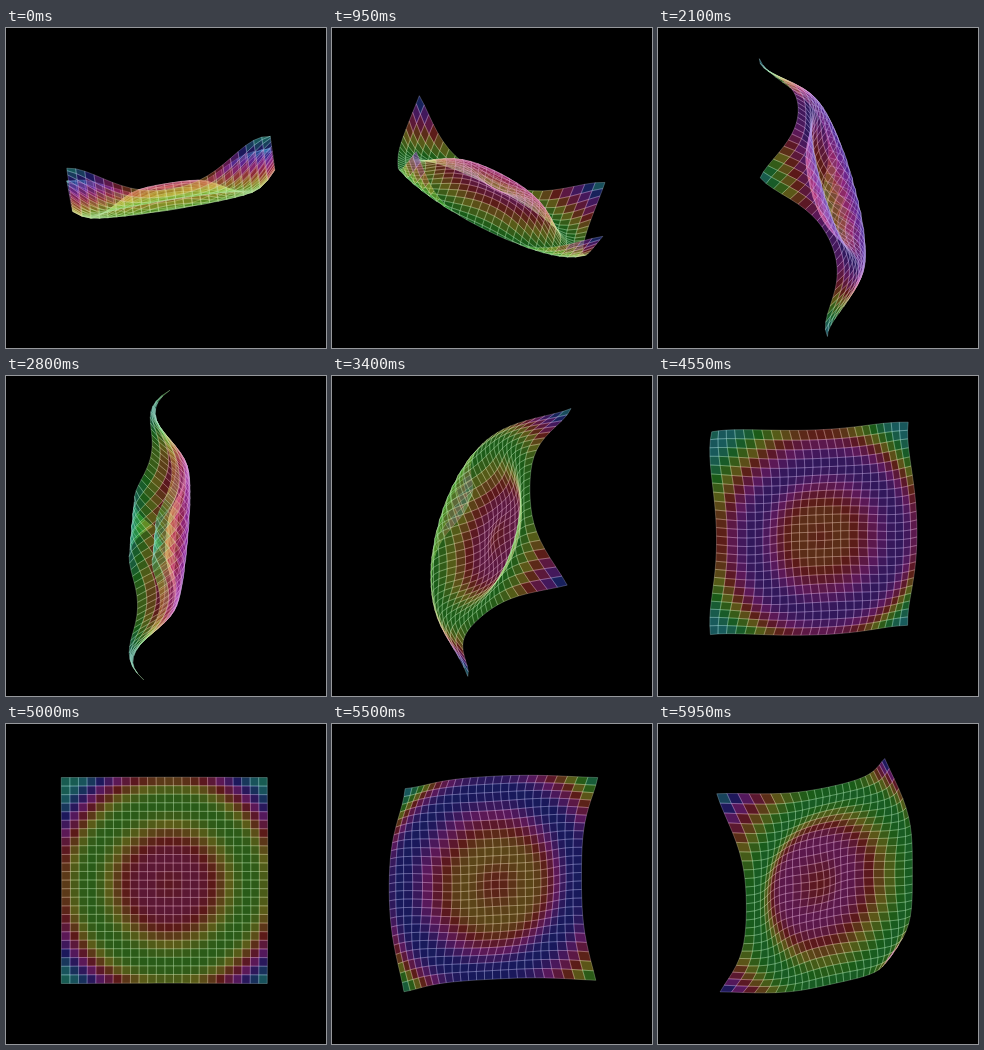
Animation, 320 px wide and 320 px high, one loop 6 s. Source, as an HTML page with a canvas:

```html
<!DOCTYPE html>
<html lang="en">
<head>
<meta charset="utf-8">
<title>Rippling mesh</title>
<style>
html, body { margin: 0; width: 100%; height: 100%; overflow: hidden; background: #000; }
canvas { display: block; }
</style>
</head>
<body>
<canvas id="stage" width="320" height="320"></canvas>
<script>
const ctx = document.getElementById('stage').getContext('2d');
const LOOP = 6000, STEP = 50;
const POINTS = 25, RADIUS = 103;
const CENTER = { x: 163, y: 160.5 };

// Grid index to a coordinate of about -1 to 1; the grid sits half a cell off centre
const coord = i => (2 * i - POINTS) / (POINTS - 1);

// Radial wave whose amplitude grows with distance
function height(x, y, phase) {
  const r = Math.hypot(x, y);
  return 0.215 * r * Math.sin(5 * r - phase);
}

// Turn about the vertical axis (b), then the horizontal axis (a)
function makeProjector(a, b) {
  const ca = Math.cos(a), sa = Math.sin(a), cb = Math.cos(b), sb = Math.sin(b);
  return (x, y, z) => {
    const depth = z * cb - x * sb;
    return {
      x: CENTER.x + RADIUS * (x * cb + z * sb),
      y: CENTER.y + RADIUS * (y * ca - depth * sa),
      z
    };
  };
}

function drawCell(corners) {
  const z = corners.reduce((sum, p) => sum + p.z, 0) / 4;
  const hue = (z * 660 + 720) % 360;
  ctx.beginPath();
  corners.forEach(p => ctx.lineTo(p.x, p.y));
  ctx.closePath();
  ctx.fillStyle = `hsla(${hue}, 58%, 50%, 0.45)`;
  ctx.fill();
  ctx.strokeStyle = `hsla(${hue}, 55%, 82%, 0.45)`;
  ctx.stroke();
}

function draw(ms) {
  const t = ms / 1000;
  const project = makeProjector(1.635 - 0.325 * t, -3.3 + 0.663 * t);
  const phase = 2 + 7.56 * t;

  const rows = [];
  for (let j = 0; j < POINTS; j++) {
    const row = [];
    for (let i = 0; i < POINTS; i++) {
      const x = coord(i), y = coord(j);
      row.push(project(x, y, height(x, y, phase)));
    }
    rows.push(row);
  }

  ctx.fillStyle = '#000';
  ctx.fillRect(0, 0, 320, 320);
  ctx.lineWidth = 0.65;
  ctx.lineJoin = 'round';
  for (let j = 0; j < POINTS - 1; j++) {
    for (let i = 0; i < POINTS - 1; i++) {
      drawCell([rows[j][i], rows[j][i + 1], rows[j + 1][i + 1], rows[j + 1][i]]);
    }
  }
}

const start = performance.now();
function tick() {
  const ms = (performance.now() - start) % LOOP;
  draw(Math.floor(ms / STEP) * STEP);
  requestAnimationFrame(tick);
}
tick();
</script>
</body>
</html>
```
